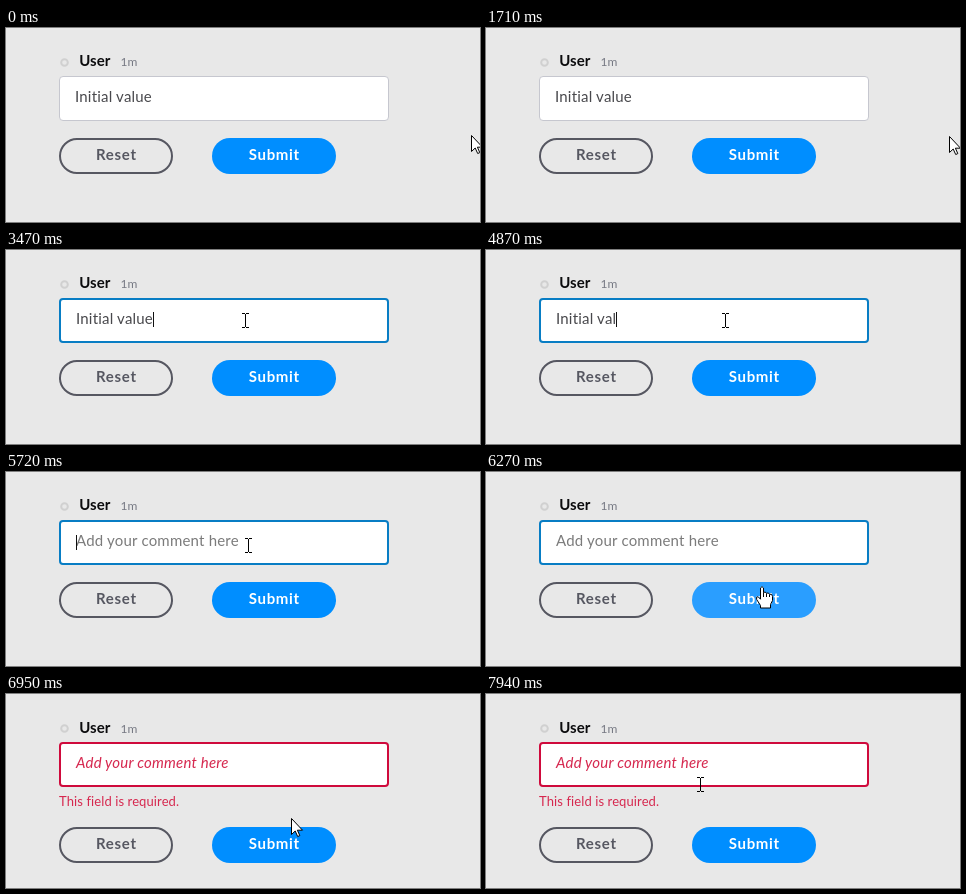
An HTML page for the animation above (8 s loop, 474 by 194 pixels).

```html
<!DOCTYPE html>
<html lang="en">
<head>
<meta charset="utf-8">
<title>Comment form</title>
<style>
  html, body { margin: 0; width: 100%; height: 100%; overflow: hidden; background: #e8e8e8; }
  svg { display: block; width: 474px; height: 194px; }
  text { font: 15px Lato, sans-serif; white-space: pre; }
  .bold { font-weight: 700; }
  .field { letter-spacing: .2px; }
  .label { font-weight: 700; letter-spacing: .7px; text-anchor: middle; }
  .small { font-size: 12px; }
  .error { font-size: 13px; letter-spacing: .1px; }
</style>
</head>
<body>
<svg viewBox="0 0 474 194">
  <rect width="474" height="194" fill="#e8e8e8"/>
  <circle cx="58.5" cy="34.5" r="3.3" fill="#e8e8e8" stroke="#d0d0d0" stroke-width="2"/>
  <g id="header">
    <text class="bold" x="73.3" y="38" fill="#0c0c0e">User</text>
    <text class="small" x="114.5" y="38" fill="#777a84">1m</text>
  </g>
  <rect id="box" fill="#fff"/>
  <text id="value" class="field" y="74"></text>
  <rect id="caret" width="1" height="15" fill="#111"/>
  <text id="error" class="error" x="53" y="112" fill="#d6284f">This field is required.</text>
  <g id="buttons">
    <rect x="54" y="111" width="112" height="34" rx="17" fill="none" stroke="#565761" stroke-width="2"/>
    <text class="label" x="110.3" y="132" fill="#565761">Reset</text>
    <rect id="submit" x="206" y="110" width="124" height="36" rx="18"/>
    <text class="label" x="268.3" y="132" fill="#fff">Submit</text>
  </g>
  <g id="cursor" stroke="#000">
    <path id="arrow" fill="#fff" d="M.5 .5V16.5L4.2 13L6.7 18.5L8.8 17.6L6.4 12.2H11.5Z"/>
    <path id="beam" fill="none" d="M-3-6.5H0M1-6.5H4M.5-6V7M-3 7.5H0M1 7.5H4"/>
    <path id="hand" fill="#fff" stroke-linejoin="round"
      d="M-1.5 2Q0-.8 1.5 2V6.5Q3.2 5.3 4.5 7.2Q6.3 6.3 7.5 8.2Q10.5 7.6 10.5 10.5V14.5L8.5 18.5V22H-1.5V19.5L-5.3 13.5Q-6.3 10.5-4 10.7L-1.5 13.2ZM1.5 6.5V11M4.5 7.5V11M7.5 8.5V11"/>
  </g>
</svg>
<script>
const LOOP = 8000;
const VALUE = 'Initial value';
const PLACEHOLDER = 'Add your comment here';
const ROW_SHIFT = 23;
const FOCUS = 2490, FIRST_DELETE = 4370, REPEAT = 4870, EMPTY = 5200;
const INVALID = 6830, SETTLED = 6950;
const BLINKS = [2490, 2990, 3470, 4000, 4530, 5040, 5540, 6040, 6490];

// Pointer paths: quadratic curves sampled at the pointer's refresh steps.
const MOVES = [
  { start: 0, end: 90, steps: 1, from: [465, 107], to: [464, 108] },
  { start: 1710, end: 2270, steps: 21, from: [463, 108], to: [254, 76] },
  { start: 3170, end: 3450, steps: 10, from: [253, 76], to: [239, 70] },
  { start: 5720, end: 6460, steps: 24, from: [242, 73], to: [285, 124] },
  { start: 7730, end: 7940, steps: 8, from: [284, 122], via: [235, 76], to: [214, 90] }
];

const el = Object.fromEntries([...document.querySelectorAll('[id]')].map(n => [n.id, n]));
const set = (node, attrs) => {
  for (const name in attrs) node.setAttribute(name, attrs[name]);
};
const show = (node, on) => set(node, { visibility: on ? 'visible' : 'hidden' });
const inside = ([x, y], left, top, right, bottom) =>
  x >= left && x < right && y >= top && y < bottom;
const smooth = p => p * p * (3 - 2 * p);

function pointerAt(t) {
  const { start, end, steps, from, to, via } = MOVES.filter(m => t >= m.start).pop();
  const p = Math.min(1, Math.floor((t - start) / (end - start) * steps) / steps);
  const s = smooth(p);
  return from.map((a, i) => {
    const mid = via ? via[i] : (a + to[i]) / 2;
    return Math.round((1 - s) ** 2 * a + 2 * s * (1 - s) * mid + s * s * to[i]);
  });
}

function deletedAt(t) {
  if (t < FIRST_DELETE) return 0;
  if (t < REPEAT) return 1;
  const interval = (EMPTY - REPEAT) / (VALUE.length - 2);
  return Math.min(VALUE.length, 2 + Math.floor((t - REPEAT) / interval + 1e-6));
}

function drawField(t, hovered) {
  const focused = t >= FOCUS && t < INVALID;
  const invalid = t >= INVALID;
  const weight = t >= FOCUS ? 2 : 1;
  const typed = VALUE.slice(0, VALUE.length - deletedAt(t));
  const left = 68 + weight;

  set(el.box, {
    x: 53 + weight / 2, y: 48 + weight / 2,
    width: 330 - weight, height: 45 - weight, rx: 4 - weight / 2,
    'stroke-width': weight,
    stroke: invalid ? '#cf0a3c' : focused ? '#087dc4' : hovered ? '#9c9dab' : '#c6c7cf'
  });
  el.value.textContent = typed || PLACEHOLDER;
  set(el.value, {
    x: left,
    fill: invalid ? '#d6284f' : typed ? '#48484c' : '#7b7b7b',
    'font-style': invalid ? 'italic' : 'normal'
  });
  el.value.style.fontStyle = invalid ? 'italic' : 'normal';

  const blinks = BLINKS.filter(b => t >= b).length;
  show(el.caret, focused && blinks % 2 === 1);
  set(el.caret, {
    x: left + (typed ? Math.round(el.value.getComputedTextLength()) : 0),
    y: typed ? 62 : 63
  });
}

function draw(t) {
  const point = pointerAt(t);
  const shift = t >= INVALID ? ROW_SHIFT : 0;
  const hitShift = t >= SETTLED ? ROW_SHIFT : 0;
  const overField = inside(point, 53, 48, 383, 93);
  const overSubmit = inside(point, 206, 110 + hitShift, 330, 146 + hitShift);

  drawField(t, overField);
  set(el.header, { transform: `translate(0 ${shift ? 1 : 0})` });
  set(el.buttons, { transform: `translate(0 ${shift})` });
  set(el.submit, { fill: overSubmit ? '#2a9eff' : '#008eff' });
  show(el.error, t >= INVALID);

  set(el.cursor, { transform: `translate(${point})` });
  show(el.beam, overField);
  show(el.hand, overSubmit);
  show(el.arrow, !overField && !overSubmit);
}

const origin = performance.now();
function tick() {
  draw((performance.now() - origin) % LOOP);
  requestAnimationFrame(tick);
}
tick();
</script>
</body>
</html>
```
